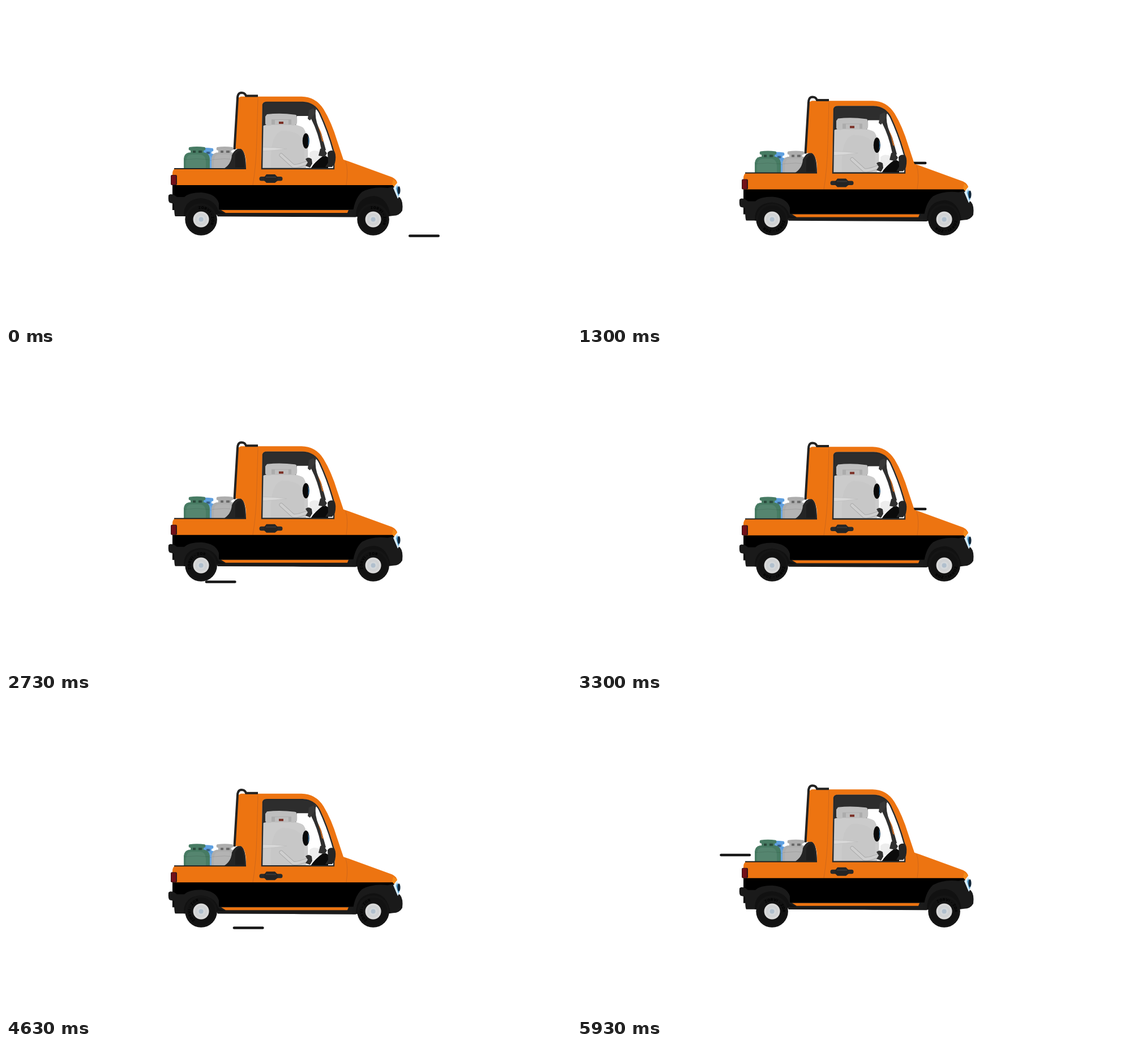
Animation, 998 px wide and 561 px high, one loop 6.01 s. Source, as an HTML page:

```html
<!DOCTYPE html>
<html lang="en">
<head>
<meta charset="utf-8">
<title>Delivery truck</title>
<style>
  html, body { margin: 0; width: 100%; height: 100%; overflow: hidden; background: #fff; }
  svg { display: block; width: 100vw; height: 100vh; }
  text { font: bold 6.5px Inter, Arial, sans-serif; letter-spacing: .3px; }
  .line { stroke: #161616; stroke-width: 4.6; stroke-linecap: round; }
  .seam { fill: none; stroke: #c9651c; stroke-width: .8; }
</style>
</head>
<body>
<svg viewBox="0 0 998 561">
  <defs>
    <path id="ring" d="M0-18.5A18.5 18.5 0 0 1 0 18.5A18.5 18.5 0 0 1 0-18.5"/>
    <g id="wheel">
      <circle r="28.3" fill="#151515"/>
      <circle r="24.5" fill="#121212"/>
      <g class="spin"><text fill="#000"><textPath href="#ring">ZORVI - ZOR</textPath></text></g>
      <circle r="14" fill="#d9d9d9"/>
      <circle r="10.5" fill="#cfd1d3"/>
      <circle r="7" fill="#d3d7da"/>
      <circle r="4" fill="#b0bfcd"/>
    </g>
    <g id="tank">
      <path d="M0 40V21Q1 12 9 10.500H37Q45 12 46 21V40Z"/>
      <path d="M10 1Q23-1 37 1Q39 2 38 6L35 7V12H12V7L9 6Q8 2 10 1Z"/>
      <path d="M16 7H21V11H16ZM26 7H32V11H26Z" fill="#000" opacity=".4"/>
      <path d="M4 40V25Q5 14 14 14H30Q38 15 39 26V40Z" fill="#fff" opacity=".08"/>
      <path d="M1 23Q23 20 45 23" fill="none" stroke="#000" stroke-width=".7" opacity=".15"/>
    </g>
  </defs>

  <path id="streak" class="line" d="M2.300 0H52.700"/>

  <g id="body">
    <!-- cargo -->
    <use href="#tank" x="328" y="250" fill="#5d9fe0"/>
    <use href="#tank" x="363" y="248" fill="#adadad"/>
    <use href="#tank" x="314" y="248" fill="#477b63"/>
    <path d="M383 288Q398 280 399 263Q405 251 414 251Q424 255 424 288Z" fill="#252525"/>
    <path d="M405 285V263Q409 255 415 255Q420 260 421 285Z" fill="#1d1d1d"/>

    <!-- bodywork; the window is a hole -->
    <path fill="#ed7411" fill-rule="evenodd" d="M294 317V296Q294 290 298 287H424Q425 258 415 252H403L410 162L415 159.700H522Q547 160 561 182Q575 205 585 238L596 271L605 274L682 302Q690 306 691 312L685 319Z
      M451 287L453 174Q454 169 461 169H524Q545 170 555 189Q571 222 581 262L580 287Z"/>
    <path d="M297 287H424" stroke="#222" stroke-width="2"/>
    <path class="seam" d="M445 162L443 235Q442 280 436 316M600 274Q605 290 601 316"/>

    <!-- roll bar -->
    <path d="M403.500 253L408.800 165Q408.500 153 416 152.900Q422 153 424 158.500H445" fill="none" stroke="#222" stroke-width="4"/>

    <!-- cabin and driver -->
    <path d="M452 287L454 174Q455 170 461 170H524Q540 170 548 182L542 194L514 194L512 212H455Z" fill="#2d2d2d"/>
    <path d="M453 287V212Q460 208 486 208Q514 208 524 214Q530 218 532 240Q536 272 529 287Z" fill="#cbcbcb"/>
    <path d="M468 287Q465 225 488 220Q514 220 523 234Q531 265 522 287Z" fill="#c7c7c7"/>
    <path d="M461 191Q486 188 512 192Q515 194 514 207Q511 212 503 210H470Q461 213 458 208V195Z" fill="#bebebe"/>
    <path d="M469 200H504V209H469Z" fill="#acacac"/>
    <path d="M475 201H499V210H475Z" fill="#bebebe"/>
    <path d="M482 204H490V208H482Z" fill="#7b2f25"/>
    <ellipse cx="529.8" cy="238" rx="6" ry="13.5" fill="#080808"/>
    <path d="M533 229Q538 238 533 247Q535 238 533 229Z" fill="#397eb5"/>
    <path d="M453 249Q475 249 496 252Q475 255 453 256Z" fill="#d8d8d8" stroke="#b9b9b9" stroke-width=".6"/>
    <path d="M536 259Q543 252 553 257L562 263L550 275L536 276Z" fill="#ededed"/>
    <path d="M538 287Q544 276 562 263L569 267V287Z" fill="#0b0b0b"/>
    <g fill="none" stroke-linecap="round" stroke-linejoin="round">
      <path id="arm" d="M486 263L507 282Q514 284 533 276" stroke="#aaa" stroke-width="7"/>
      <path d="M486 263L507 282Q514 284 533 276" stroke="#cfcfcf" stroke-width="5"/>
    </g>
    <path d="M529 270Q534 265 540 270L541 278L537 285L529 282L533 276Z" fill="#303030"/>

    <!-- pillars and mirrors -->
    <path d="M542 183L547 185Q545 202 557 225L565 254L558 259Q553 226 539 199Z" fill="#303030"/>
    <path d="M551 211L556 222L561 240L558 238Q555 223 551 211Z" fill="#ce6b20"/>
    <path d="M452 287L454 174Q455 170 461 170H524Q545 171 554 189Q570 223 580 262L579 287Z" fill="none" stroke="#292929" stroke-width="2.4"/>
    <path d="M535 184L543 180Q548 184 544 192L537 202L533 199Z" fill="#383838"/>
    <path d="M555 252L560 250L567 260L563 266L552 264Z" fill="#303030"/>
    <path d="M568 259Q572 253 580 256Q584 264 581 277L576 284H564L569 276Z" fill="#252525"/>

    <!-- lower body -->
    <path d="M294 316H685L692 340V360H294Z" fill="#000"/>
    <path d="M366 359H618V372.500L522 372L374 371.300Z" fill="#1b1b1b"/>
    <path d="M380 360H605L603 365H388Z" fill="#ed7411"/>
    <path d="M374 361L388 367H376Z" fill="#111"/>
    <path d="M287 334Q290 330 298 334L302 337H315Q323 329 345 329Q371 331 376 348V360L366 371H299Q297 370 297 349L289 347Q286 345 287 334Z" fill="#1a1a1a"/>
    <path d="M314 371Q313 341 344 339Q373 342 376 366L365 371Z" fill="#111"/>
    <path d="M612 372Q614 341 629 328Q647 318 674 321L684 319Q688 335 696 338Q702 345 700 361Q695 370 684 370L676 371Z" fill="#1a1a1a"/>
    <path d="M618 371Q618 337 650 335Q674 337 679 370Z" fill="#111"/>
    <rect x="291" y="298" width="11" height="18" rx="2" fill="#35161a"/>
    <rect x="292" y="299" width="8" height="16" rx="1" fill="#721019"/>
    <path d="M684 306L691 311L685 319L682 314Z" fill="#f58a18"/>
    <path d="M691 314L684 321L692 340Q698 332 696 321Z" fill="#d9eefb"/>
    <path d="M691 317L689 322L693 336Q698 326 691 317Z" fill="#4c9acb"/>
    <ellipse cx="694" cy="325" rx="2.5" ry="7" fill="#122536"/>

    <!-- door handle -->
    <rect x="447.5" y="301" width="41" height="7.5" rx="3.5" fill="#292929"/>
    <path d="M460 297H475L480 302V308L475 312H460L456 308V302Z" fill="#242424"/>
    <path d="M459 302H477" stroke="#383838" stroke-width="2"/>
  </g>

  <use href="#wheel" x="344.6" y="376.5"/>
  <use href="#wheel" x="648.6" y="376.5"/>
</svg>
<script>
  const LOOP = 6010;
  const streak = document.getElementById('streak');
  const body = document.getElementById('body');
  const spin = document.querySelector('.spin');
  const start = performance.now();

  // Two pictures per 100 ms: one on the beat, one a third of the way on.
  function step(t) {
    t = Math.min(t, 5999);
    return Math.floor(t / 100) * 100 + (t % 100 >= 30 ? 100 / 3 : 0);
  }

  function draw(now) {
    const t = step(Math.max(0, now - start) % LOOP);
    const p = t % 1000 / 1000;
    const high = t % 2000 >= 1000;
    body.setAttribute('transform', `translate(0 ${25 * Math.min(p, 1 - p)})`);
    spin.setAttribute('transform', `rotate(${360 * p - 14})`);
    streak.setAttribute('transform', `translate(${(high ? 709.5 : 711) - 490 * p} ${high ? 277 : 405.5})`);
    requestAnimationFrame(draw);
  }
  draw(start);
</script>
</body>
</html>
```
